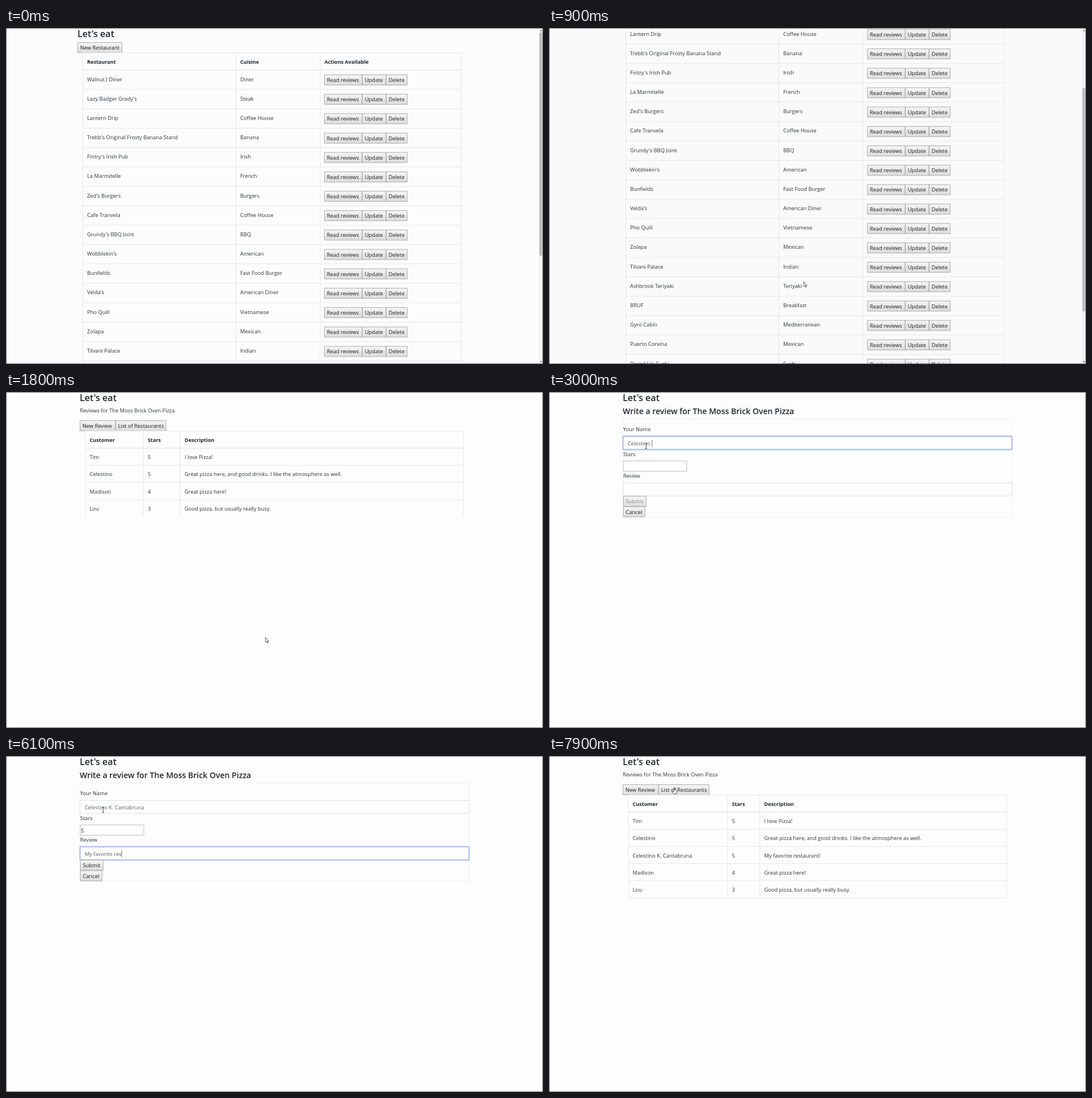
An HTML page that plays this animation: 947 by 592 pixels, repeating every 8000 ms.

```html
<!DOCTYPE html>
<html lang="en">
<head>
<meta charset="utf-8">
<title>Let's eat</title>
<style>
  html, body { margin: 0; width: 100%; height: 100%; overflow: hidden; background: #fdfdfd; }
  svg { display: block; width: 100%; height: 100%; }
  text { font: 9.35px "Open Sans", "Noto Sans", sans-serif; fill: #2f3337; white-space: pre; }
  .h3 { font-size: 16.1px; font-weight: 600; fill: #212529; }
  .h4 { font-size: 14.05px; font-weight: 600; fill: #212529; }
  .th { font-size: 9.1px; font-weight: 700; fill: #212529; }
  .btn { fill: #1c1c1c; }
  .off { fill: #8f8f8f; }
  .val { fill: #5c6167; }
  .line { fill: none; stroke: #e6e7e9; }
</style>
</head>
<body>
<svg id="stage" viewBox="0 0 947 592"></svg>
<script>
const LOOP = 8000, W = 947, H = 592;
const PLACE = "The Moss Brick Oven Pizza";
const NAME = "Celestino K. Cantabruna";
const REVIEW = "My favorite restaurant!";

const restaurants = `Walnut J Diner|Diner
Lazy Badger Grady's|Steak
Lantern Drip|Coffee House
Trebb's Original Frosty Banana Stand|Banana
Fintry's Irish Pub|Irish
La Marmitelle|French
Zed's Burgers|Burgers
Cafe Tranvela|Coffee House
Grundy's BBQ Joint|BBQ
Wobblekin's|American
Bunfields|Fast Food Burger
Velda's|American Diner
Pho Quill|Vietnamese
Zolapa|Mexican
Tilvani Palace|Indian
Ashbrook Teriyaki|Teriyaki
BRUF|Breakfast
Gyro Cabin|Mediterranean
Puerto Corvina|Mexican
Bramble's Sushi|Sushi
${PLACE}|Pizza
Noodle Orchard|Chinese
Harbor Spoon|Seafood`.split("\n").map(r => r.split("|"));

const reviews = [
  ["Tim", 5, "I love Pizza!"],
  ["Celestino", 5, "Great pizza here, and good drinks. I like the atmosphere as well."],
  ["Madison", 4, "Great pizza here!"],
  ["Lou", 3, "Good pizza, but usually really busy."]
];
const reviewsAfter = [...reviews.slice(0, 2), [NAME, 5, REVIEW], ...reviews.slice(2)];

const text = (x, y, s, cls = "", id = "") => `<text x="${x}" y="${y}" class="${cls}" id="${id}">${s}</text>`;
const path = (d, cls = "line", more = "") => `<path d="${d}" class="${cls}" ${more}/>`;
const box = (x, y, w, h, stroke, fill = "none") =>
  `<rect x="${x}" y="${y}" width="${w}" height="${h}" fill="${fill}" stroke="${stroke}"/>`;
const button = (x, y, w, label, id = "") =>
  box(x + .5, y + .5, w - 1, 18, "#adadad", "url(#face)") + text(x + 4.7, y + 13.1, label, "btn", id);
const group = (id, body) => `<g id="${id}">${body}</g>`;

// Ruled table: first row is the header, the rest share one pitch.
function grid(x0, x1, top, head, pitch, rows, cols, closed = true) {
  const end = head + pitch * rows;
  let d = `M${x0} ${top}H${x1}`;
  for (let i = 0; i < rows + closed; i++) d += `M${x0} ${head + pitch * i}H${x1}`;
  for (const x of [x0, ...cols, x1]) d += `M${x} ${top}V${end}`;
  return path(d) + path(`M${x0} ${head}H${x1}`);
}

function listPage() {
  const pitch = 34.17;
  let s = text(126, 15.8, "Let's eat", "h3") + button(126, 25, 79, "New Restaurant")
    + grid(135.5, 803, 43.7, 74, pitch, restaurants.length, [405.3, 554])
    + text(143, 62.8, "Restaurant", "th") + text(413, 62.8, "Cuisine", "th")
    + text(561.4, 62.8, "Actions Available", "th");
  restaurants.forEach(([name, cuisine], i) => {
    const y = pitch * i;
    s += text(143, 93.6 + y, name) + text(413, 93.6 + y, cuisine)
      + button(561, 82 + y, 67.5, "Read reviews") + button(628, 82 + y, 42.5, "Update")
      + button(670, 82 + y, 38, "Delete");
  });
  return s;
}

function reviewPage(rows, c1, c2, closed) {
  const pitch = 30.2;
  let s = text(130, 15.8, "Let's eat", "h3") + text(130, 36.3, "Reviews for " + PLACE)
    + button(130, 50, 63.5, "New Review") + button(193, 50, 89.5, "List of Restaurants")
    + grid(140, 807, 68.7, 99, pitch, rows.length, [c1, c2], closed);
  const xs = [147.5, c1 + 7.7, c2 + 7.7];
  ["Customer", "Stars", "Description"].forEach((h, i) => s += text(xs[i], 87.7, h, "th"));
  rows.forEach((row, r) => row.forEach((v, i) => s += text(xs[i], 118.2 + pitch * r, v)));
  return s;
}

function formPage() {
  return text(130, 15.8, "Let's eat", "h3") + text(130, 39.2, "Write a review for " + PLACE, "h4")
    + box(130.5, 47.7, 686, 172.5, "#f0f1f2")
    + text(130.7, 69.4, "Your Name") + text(130.7, 113, "Stars") + text(130.7, 151, "Review")
    + box(130.5, 78.2, 686, 23, "#dcdee0", "#fefefe")
    + box(131, 121.5, 112, 18, "#bdbdbd", "#fefefe")
    + box(130.5, 160, 686, 23, "#dcdee0", "#fefefe")
    + `<rect id="glow" fill="none" stroke="#dbe4fa" stroke-width="3.4" rx="1.5"/>`
    + `<rect id="ring" fill="none" stroke="#a3b6e6" stroke-width="1.3" rx="1"/>`
    + text(138.7, 94, "", "val", "name") + text(132.2, 134.6, "", "btn", "stars")
    + text(138.7, 175.6, "", "val", "review")
    + path("", "", 'id="caret" stroke="#444" stroke-width=".8"')
    + button(130.7, 183, 41, "Submit", "submit") + button(130.7, 201.5, 39, "Cancel");
}

const outline = 'fill="#fff" stroke="#333" stroke-width=".8" stroke-linejoin="round"';
const cursors = group("arrow", path("M0 0V8.4L1.9 6.7L3.2 9.8L4.6 9.2L3.3 6.2H5.8Z", "", outline))
  + group("hand", path("M-.8 .6Q0 -.5 .8 .6V4L4.3 5V8.5L3.3 11.5H-1L-3 7.6Q-2.6 6-.8 7.3Z", "", outline))
  + group("beam", path("M-1.6 -4.5H1.6M0 -4.5V4.5M-1.6 4.5H1.6", "", 'fill="none" stroke="#333" stroke-width=".9"'));

const stage = document.getElementById("stage");
stage.innerHTML = `<defs><linearGradient id="face" x2="0" y2="1">
    <stop stop-color="#f5f5f5"/><stop offset="1" stop-color="#dcdcdc"/></linearGradient></defs>
  <rect id="paper" width="${W}" height="${H}"/>`
  + group("list", listPage())
  + group("before", reviewPage(reviews, 242.3, 307.3, false))
  + group("after", reviewPage(reviewsAfter, 314.7, 371.8, true))
  + group("form", formPage())
  + group("bar", `<rect x="940" width="7" height="${H}" fill="#f1f1f1"/>
      <rect id="thumb" x="940.6" width="5" height="393" fill="#bcbcbc"/>`
      + path("M942 5.5L943.6 3L945.2 5.5Z", "", 'fill="#555"') + path("M942 587L943.6 589.5L945.2 587Z", "", 'fill="#555"'))
  + box(.5, .5, W - 1, H - 1, "#6a6a6a") + group("pointer", cursors);

const $ = id => document.getElementById(id);
const set = (el, attrs) => { for (const k in attrs) $(el).setAttribute(k, attrs[k]); };
const show = (id, on) => $(id).style.display = on ? "" : "none";

// Each track holds [time, ...values]; a value lasts until the next entry.
const pages = [[0, "list"], [1600, "before"], [2400, "form"], [6900, "after"]];
const scroll = [[0, 0], [600, 62], [900, 148.3], [1000, 278]];
const pointer = [
  [0, ""], [600, "arrow", 449.3, 447], [1300, "hand", 567, 501.5], [1600, "arrow", 560, 498],
  [1800, "arrow", 457.6, 432.6], [1900, "arrow", 290, 210], [2100, "hand", 163, 57],
  [2400, "arrow", 163, 57], [2600, "beam", 171.3, 95], [6500, "beam", 173, 170],
  [6800, "hand", 152, 190], [6900, "arrow", 121, 178], [7200, "arrow", 122, 140],
  [7400, "arrow", 148, 104], [7600, "arrow", 190, 78], [7700, "hand", 214, 62], [7900, "hand", 220.8, 55.5]
];
const focus = [[0, ""], [2600, "name"], [3700, "stars"], [4200, "review"], [6800, ""]];
const nameTyped = [[0, 0], [2700, 5], [3000, 10], [3100, 12], [3400, 18], [3500, NAME.length]];
const reviewTyped = [
  [0, 0], [4600, 5], [4900, 6], [5100, 7], [5300, 8], [5400, 9], [5800, 11],
  [6100, 15], [6300, 18], [6400, 21], [6500, REVIEW.length]
];
const fields = { name: [130.5, 78, 686, 23.5], stars: [131, 121.5, 112, 18], review: [130.5, 159.7, 686, 23.5] };

const at = (track, t) => track.filter(k => k[0] <= t).pop().slice(1);

function drawForm(t) {
  const [field] = at(focus, t);
  $("name").textContent = NAME.slice(0, at(nameTyped, t)[0]);
  $("stars").textContent = t >= 4000 ? "5" : "";
  $("review").textContent = REVIEW.slice(0, at(reviewTyped, t)[0]);
  set("submit", { class: t >= 4600 ? "btn" : "off" });
  for (const id of ["glow", "ring"]) {
    show(id, field);
    if (field) {
      const [x, y, width, height] = fields[field];
      set(id, { x, y, width, height });
    }
  }
  const typing = field && field !== "stars" && $(field).textContent;
  show("caret", typing);
  if (typing) {
    const x = 139.2 + $(field).getComputedTextLength();
    set("caret", { d: `M${x} ${fields[field][1] + 6.5}v12.5` });
  }
}

function render(t) {
  const [page] = at(pages, t), [y] = at(scroll, t), [kind, px, py] = at(pointer, t);
  for (const p of pages) show(p[1], p[1] === page);
  show("bar", page === "list");
  set("paper", { fill: page === "list" ? (y ? "#fafafa" : "#fcfcfc") : "#fdfdfd" });
  set("list", { transform: `translate(0 ${-y})` });
  set("thumb", { y: 8 + y * 576 / 870 });
  if (page === "form") drawForm(t);
  for (const c of ["arrow", "hand", "beam"]) show(c, c === kind);
  if (kind) set("pointer", { transform: `translate(${px} ${py})` });
}

const start = performance.now();
function tick() {
  render((performance.now() - start) % LOOP);
  requestAnimationFrame(tick);
}
tick();
</script>
</body>
</html>
```
